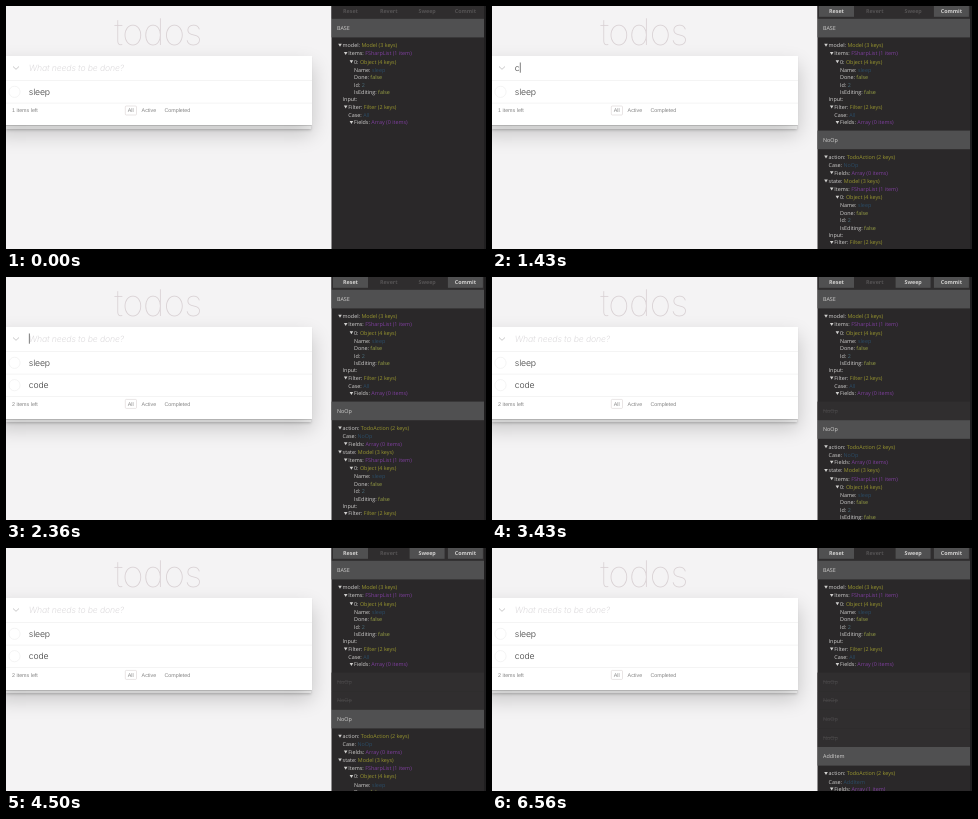
An HTML page for the animation above (8000 ms loop, 480 by 243 pixels).

```html
<!DOCTYPE html>
<html lang="en">
<head>
<meta charset="utf-8">
<title>Todos with history panel</title>
<style>
  html, body { margin: 0; width: 100%; height: 100%; overflow: hidden; background: #f4f3f4; }
  #app, #log { position: absolute; left: 0; top: 0; width: 480px; height: 243px; overflow: hidden; }
  svg { position: absolute; left: 0; top: 0; display: block; }
  text { text-rendering: geometricPrecision; white-space: pre; }
  .title { font: 100 36.7px Inter, Roboto, sans-serif; fill: #d8d0d3; text-anchor: middle; letter-spacing: -.6px; }
  .todo { font: 300 8.7px Inter, "Liberation Sans", sans-serif; fill: #444; letter-spacing: -.15px; }
  .hint { font-style: italic; fill: #dedcde; }
  .foot { font: 5.35px "Liberation Sans", sans-serif; fill: #858585; }
  .log { font: 5.4px "Open Sans", "Noto Sans", sans-serif; fill: #d2d1d0; }
  .btn { font-weight: 700; text-anchor: middle; }
  .off { fill: #555354; }
  .skip { fill: #4b494a; text-decoration: line-through; }
  .obj { fill: #99962f; }
  .list { fill: #7f3f9f; }
  .str { fill: #2b4c66; }
  .num { fill: #4a6c7a; }
  .bool { fill: #98a045; }
  .card { position: absolute; left: -10px; top: 49.5px; width: 315.8px; background: #fff;
    box-shadow: 0 .5px 1px rgba(0,0,0,.14), 0 9px 19px rgba(0,0,0,.2); }
  .sheet { position: absolute; left: 0; width: 305px; height: 3.4px; background: #f6f6f6;
    box-shadow: 0 1px 3px rgba(0,0,0,.24); }
</style>
</head>
<body>
<div id="app"></div>
<div id="log"></div>
<script>
const LOOP = 8000;
const ROW = 22.4, HEAD = 18.6, FIRST = 124.6;
const LEFT = 325.5, RIGHT = 478;

// Each step changes part of the state at its time in ms.
const STEPS = [
  [0,    { typed: '', caret: false, items: ['sleep'], live: false, skipped: 0 }],
  [500,  { caret: true }],
  [960,  { caret: false }],
  [1230, { typed: 'c', caret: true }],
  [1430, { live: true }],
  [1500, { typed: 'co' }],
  [1560, { typed: 'cod' }],
  [1700, { typed: 'code' }],
  [1900, { typed: '', items: ['sleep', 'code'] }],
  [2900, { caret: false }],
  [3230, { skipped: 1 }],
  [4500, { skipped: 2 }],
  [5300, { skipped: 3 }],
  [6560, { skipped: 4 }]
];

// Tree rows: depth, key, value, value class, is a branch
const branch = (depth, key, value, cls = 'obj') => [depth, key, value, cls, true];
const leaf = (depth, key, value, cls = 'str') => [depth, key, value, cls, false];

const model = (key, d) => [
  branch(d, key, 'Model (3 keys)'),
  branch(d + 1, 'Items', 'FSharpList (1 item)', 'list'),
  branch(d + 2, '0', 'Object (4 keys)'),
  leaf(d + 3, 'Name', 'sleep'),
  leaf(d + 3, 'Done', 'false', 'bool'),
  leaf(d + 3, 'Id', '2', 'num'),
  leaf(d + 3, 'IsEditing', 'false', 'bool'),
  leaf(d + 1, 'Input', ''),
  branch(d + 1, 'Filter', 'Filter (2 keys)'),
  leaf(d + 2, 'Case', 'All'),
  branch(d + 2, 'Fields', 'Array (0 items)', 'list')
];

const action = (name, fields) => [
  branch(0, 'action', 'TodoAction (2 keys)'),
  leaf(1, 'Case', name),
  branch(1, 'Fields', `Array (${fields})`, 'list'),
  ...model('state', 0)
];

const text = (x, y, str, cls) => `<text x="${x}" y="${y}" class="${cls}">${str}</text>`;
const rect = (x, y, w, h, fill) => `<rect x="${x}" y="${y}" width="${w}" height="${h}" fill="${fill}"/>`;
const svg = body => `<svg width="480" height="243" viewBox="0 0 480 243">${body}</svg>`;

function tree(rows, top) {
  let y = top + 28.4;
  return rows.map(([depth, key, value, cls, open]) => {
    const x = 336.6 + 5.7 * (open ? depth : depth - 1);
    const arrow = open ? `<path d="M${x - 4.4} ${y - 3.4}h3.6l-1.8 3z" fill="#d2d1d0"/>` : '';
    const out = arrow + text(x, y, `${key}: <tspan class="${cls}">${value}</tspan>`, 'log');
    y += open ? 8.2 : 7.4;
    return out;
  }).join('');
}

const header = (top, name) =>
  rect(LEFT, top, RIGHT - LEFT, HEAD, '#505051') + text(331, top + 11.2, name, 'log');

const skippedRow = top =>
  rect(LEFT, top, RIGHT - LEFT, HEAD, '#302e2f') + text(331, top + 11.2, 'NoOp', 'log skip');

function drawLog({ live, skipped }) {
  const enabled = { Reset: live, Commit: live, Sweep: skipped > 0 };
  const buttons = ['Reset', 'Revert', 'Sweep', 'Commit'].map((name, i) => {
    const x = 327 + 38.3 * i, on = enabled[name];
    return (on ? rect(x, 0, 35, 10.8, '#505051') : '') +
      text(x + 17.5, 7.2, name, on ? 'log btn' : 'log btn off');
  }).join('');

  let body = rect(LEFT, 0, 480 - LEFT, 243, '#2a2829') + rect(LEFT, 0, RIGHT - LEFT, 12.8, '#2f2d2e') +
    rect(RIGHT, 0, 2, 243, '#201f20') + buttons;
  body += header(12.8, 'BASE') + tree(model('model', 0), 12.8);
  if (live) {
    for (let i = 0; i < skipped; i++) body += skippedRow(FIRST + HEAD * i);
    const top = FIRST + HEAD * skipped;
    const last = skipped === 4;
    const name = last ? 'AddItem' : 'NoOp';
    body += header(top, name) + tree(action(name, last ? '1 item' : '0 items'), top);
  }
  return svg(body);
}

function drawApp({ typed, caret, items }) {
  const foot = 74.4 + ROW * items.length;
  const height = foot - 49.5 + 22.6;
  const line = y => rect(0, y, 306, .5, '#e9e8e9');
  const rows = items.map((name, i) => {
    const y = 74.4 + ROW * i;
    return line(y) + `<circle cx="8.5" cy="${y + 11.4}" r="5.6" fill="none" stroke="#ececec" stroke-width=".6"/>` +
      text(22.8, y + 14.6, name, 'todo');
  }).join('');
  const caretX = 22.9 + 4.95 * typed.length;

  return `<div class="sheet" style="top:${foot + 22.4}px"></div>
    <div class="card" style="height:${height}px"></div>` + svg(
    text(152.1, 38.8, 'todos', 'title') +
    '<path d="M7 60.5l3 2.8l3-2.8" fill="none" stroke="#c4c3c4" stroke-width=".9"/>' +
    (typed ? text(22.8, 65.2, typed, 'todo') : text(22.8, 65.2, 'What needs to be done?', 'todo hint')) +
    (caret ? rect(caretX, 56.5, .7, 10.2, '#444') : '') +
    rows + line(foot) +
    text(6, foot + 9.6, `${items.length} items left`, 'foot') +
    `<rect x="119.3" y="${foot + 3.2}" width="11.2" height="9" rx="1" fill="none" stroke="#d3cacb" stroke-width=".5"/>` +
    text(121.8, foot + 9.6, 'All', 'foot') +
    text(135.6, foot + 9.6, 'Active', 'foot') +
    text(158.4, foot + 9.6, 'Completed', 'foot'));
}

const app = document.getElementById('app');
const log = document.getElementById('log');
const start = performance.now();
let shown = -1;

function frame() {
  const t = (performance.now() - start) % LOOP;
  const count = STEPS.filter(([at]) => at <= t).length;
  if (count !== shown) {
    shown = count;
    const state = Object.assign({}, ...STEPS.slice(0, count).map(step => step[1]));
    app.innerHTML = drawApp(state);
    log.innerHTML = drawLog(state);
  }
  requestAnimationFrame(frame);
}
frame();
</script>
</body>
</html>
```
